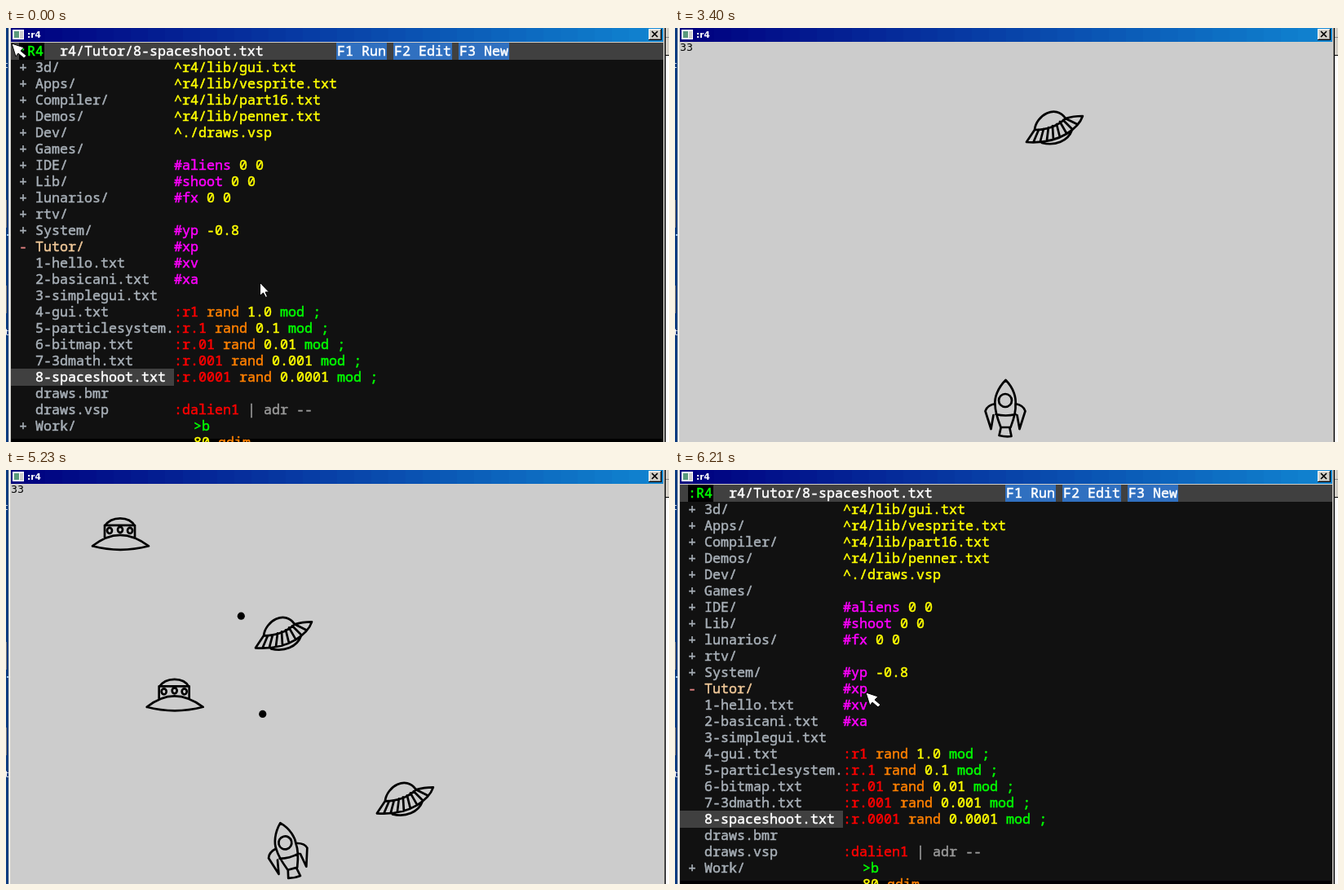
An HTML page with a canvas for the animation above (8000 ms loop, 813 px wide and 508 px high).

```html
<!DOCTYPE html>
<html lang="en">
<head>
<meta charset="utf-8">
<title>r4</title>
<style>
  html, body { margin: 0; width: 100%; height: 100%; overflow: hidden; background: #fff; }
  canvas { display: block; }
</style>
</head>
<body>
<canvas id="stage" width="813" height="508"></canvas>
<script>
const ctx = document.getElementById('stage').getContext('2d');
const LOOP = 8000, GAME_START = 2140, GAME_END = 6210, MOUSE_HIDDEN = 2710;

// Moments at which the screen refreshes; the picture holds in between.
const REFRESH = [0, 400, 840, 2140, 2710, 2860, 2980, 3130, 3260, 3400, 3560, 3700, 3830,
  3980, 4110, 4260, 4410, 4570, 4690, 4830, 4980, 5105, 5230, 5380, 5530, 5655, 5780,
  5940, 6090, 6210];

const MONO = '16.667px "Noto Sans Mono", "DejaVu Sans Mono", monospace';
const CELL = 10, ROW = 20, BAR = 21;

function rect(color, x, y, w, h) {
  ctx.fillStyle = color;
  ctx.fillRect(x, y, w, h);
}

function text(str, x, y, color, font) {
  ctx.font = font;
  ctx.fillStyle = color;
  ctx.fillText(str, x, y);
}

// Editor text, thickened a little to look like a solid screen font.
function monoText(str, x, y, color) {
  text(str, x, y, color, MONO);
  ctx.strokeStyle = color;
  ctx.lineWidth = .5;
  ctx.strokeText(str, x, y);
}

function at(x, y, draw, degrees = 0) {
  ctx.save();
  ctx.translate(x, y);
  ctx.rotate(degrees * Math.PI / 180);
  draw();
  ctx.restore();
}

function track(keys, t) {
  const i = Math.max(1, keys.findIndex(k => k[0] >= t));
  const [t0, a] = keys[i - 1], [t1, b] = keys[i];
  return a + (b - a) * Math.min(1, Math.max(0, (t - t0) / (t1 - t0)));
}

// ---------- window ----------

function drawFrame() {
  rect('#0a3c80', 0, 0, 3, 508);
  rect('#d4d0c8', 3, 0, 803, 508);
  rect('#fff', 4, 0, 1, 508);
  rect('#777', 0, 211, 1, 34);
  rect('#777', 0, 316, 1, 34);
  text('t', -2, 49, '#fff', '11px "DejaVu Sans", sans-serif');
  text('t', -1, 377, '#fff', '11px "DejaVu Sans", sans-serif');
  rect('#9cf', 1, 253, 2, 2);

  const bands = 38, width = 800 / bands;
  for (let i = 0; i < bands; i++) {
    const p = i / (bands - 1), x = Math.round(6 + i * width);
    rect(`rgb(${16 * p},${132 * p},${128 + 80 * p})`, x, 0, 806 - x, 17);
  }
  rect('#d4d0c8', 806, 0, 1, 508);
  rect('#808080', 807, 0, 1, 508);
  rect('#000', 808, 0, 1, 508);
  rect('#fff', 809, 0, 4, 508);
  rect('#d4d0c8', 809, 0, 4, 33);
  rect('#888', 809, 11, 4, 1);
  rect('#000', 809, 33, 4, 1);

  rect('#fff', 8, 2, 14, 12);
  rect('#5a9a7c', 10, 4, 6, 8);
  rect('#ccc', 17, 4, 4, 9);
  text(':r4', 26, 12, '#fff', 'bold 10.5px "DejaVu Sans", sans-serif');

  rect('#000', 788, 1, 16, 14);
  rect('#fff', 788, 1, 15, 13);
  rect('#808080', 789, 2, 14, 12);
  rect('#d4d0c8', 789, 2, 13, 11);
  ctx.strokeStyle = '#000';
  ctx.lineWidth = 1.7;
  ctx.stroke(new Path2D('M792 4L799 11M799 4L792 11'));
}

const mouseShape = new Path2D('M.5 .5V16.5L4.5 13L7.5 18.5L9.5 17.5L7 12H11.5Z');
const pointerShape = new Path2D('M0 0L15 5L11 9L18 15L15 18L8 12L5 16Z');

function drawCursor(shape, x, y) {
  at(x, y, () => {
    ctx.lineWidth = 1;
    ctx.strokeStyle = '#000';
    ctx.fillStyle = '#fff';
    ctx.fill(shape);
    ctx.stroke(shape);
  });
}

// ---------- editor ----------

const FILES = ['+ 3d/', '+ Apps/', '+ Compiler/', '+ Demos/', '+ Dev/', '+ Games/', '+ IDE/',
  '+ Lib/', '+ lunarios/', '+ rtv/', '+ System/', '- Tutor/', '  1-hello.txt',
  '  2-basicani.txt', '  3-simplegui.txt', '  4-gui.txt', '  5-particlesystem.',
  '  6-bitmap.txt', '  7-3dmath.txt', '  8-spaceshoot.txt', '  draws.bmr', '  draws.vsp',
  '+ Work/'];

const SHOOT_CODE = `^r4/lib/gui.txt
^r4/lib/vesprite.txt
^r4/lib/part16.txt
^r4/lib/penner.txt
^./draws.vsp

#aliens 0 0
#shoot 0 0
#fx 0 0

#yp -0.8
#xp
#xv
#xa

:r1 rand 1.0 mod ;
:r.1 rand 0.1 mod ;
:r.01 rand 0.01 mod ;
:r.001 rand 0.001 mod ;
:r.0001 rand 0.0001 mod ;

:dalien1 | adr --
\t>b
\t80 qdim`.split('\n');

const MATH_CODE = `^r4/lib/gui.txt
^r4/lib/3d.txt

#xcam 0 #ycam 0 #zcam -10.0

:freelook
\txypen
\tsh 1 >> - 7 << swap
\tsw 1 >> - neg 7 << swap
\tneg mrotx mroty ;

:3dop project3d op ;
:3dline project3d line ;

:drawboxz | z --
\t-0.5 -0.5 pick2 3dop
\t0.5 -0.5 pick2 3dline
\t0.5 0.5 pick2 3dline
\t-0.5 0.5 pick2 3dline
\t-0.5 -0.5 rot 3dline ;

:drawlinez | x1 x2 --
\t2dup -0.5 3dop 0.5 3dline ;

:drawcube | --
\t-0.5 drawboxz`.split('\n');

function tokenColor(token) {
  if (token[0] === '|') return '#999';
  if (token[0] === '#') return '#f0f';
  if (token[0] === ':') return '#f00';
  if (token[0] === '^' || /^-?\d[\d.]*$/.test(token)) return '#ff0';
  return /^(mod|swap|neg|;|>b|>>|<<|-)$/.test(token) ? '#0f0' : '#ff8000';
}

function drawCode(lines) {
  lines.forEach((line, row) => {
    const left = line[0] === '\t' ? 230 : 206;
    for (const m of line.trim().matchAll(/\|.*|\S+/g))
      monoText(m[0], left + m.index * CELL, 54 + row * ROW, tokenColor(m[0]));
  });
}

function drawEditor(selected, code) {
  rect('#111', 6, 18, 800, 490);
  rect('#000', 6, 504, 800, 4);
  rect('#404040', 6, 18, 800, BAR);
  rect('#000', 16, 18, 31, BAR);
  monoText(':R4', 16, 34, '#0f0');
  monoText('r4/Tutor/' + FILES[selected].trim(), 66, 34, '#fff');
  [['F1 Run', 406], ['F2 Edit', 476], ['F3 New', 556]].forEach(([label, x]) => {
    rect('#3070c0', x - 1, 18, label.length * CELL + 2, BAR);
    monoText(label, x, 34, '#fff');
  });

  rect('#404040', 6, 38 + selected * ROW, 200, BAR);
  FILES.forEach((name, row) => {
    const open = name[0] === '-', y = 54 + row * ROW;
    monoText(name[0], 16, y, open ? '#e08080' : '#a8b0b8');
    monoText(name.slice(2), 36, y, row === selected ? '#fff' : open ? '#f0c898' : '#a8b0b8');
  });
  drawCode(code);
}

// ---------- game ----------

const rocketShape = new Path2D(`M0 -34C-10 -24 -14 -12 -13 -4C-13 6 -9 16 -6 24
  H6C9 16 13 6 12 -4C13 -12 10 -24 0 -34ZM-12 8Q0 11 12 8M-6 25L-8 34Q0 36 7 35L5 25
  M-13 -5Q-23 -3 -25 4L-18 26L-15 9M12 -5Q22 -3 24 4L17 26L14 9
  M7.5 -9A8 8 0 1 1 -8.5 -9A8 8 0 1 1 7.5 -9`);

const domeShape = new Path2D(`M16 10Q22 .5 35 .5Q48 .5 53 10M16 24V9H53V24
  M1 34.5Q18 21 35 21Q52 21 70 34.5Q35 43.5 1 34.5
  M25 15.5A3 3.5 0 1 1 19 15.5A3 3.5 0 1 1 25 15.5
  M38 14.5A3 3.5 0 1 1 32 14.5A3 3.5 0 1 1 38 14.5
  M50 15.5A3 3.5 0 1 1 44 15.5A3 3.5 0 1 1 50 15.5`);

const saucerShape = new Path2D(`M11 24C13 6 37 -8 49 10M11 24Q34 24 49 10
  M11 24L1 39Q30 41 50 29Q66 19 70 7Q58 7 49 10M20 40C36 44 52 38 57 24
  M16 24L10 38M22 23L18 38M28 21L26 37M33 19L34 36M38 17L42 33M42 14L50 28M46 12L57 23M49 10L63 17`);

// Distance fallen by every alien, the clock all game objects share.
const FALL = [[2860, -217], [2980, -198], [3260, -153], [3400, -130], [3560, -103],
  [4260, 0], [4830, 85], [5780, 242.5], [6210, 314]];
const ROCKET_X = [[3560, 405.5], [3700, 409], [3865, 425], [4091, 456], [4260, 467.5],
  [4383, 466], [4635, 437], [4830, 408.5], [5780, 258], [6210, 190]];
const ROCKET_TILT = [[3560, 0], [3865, 13], [4091, 9.5], [4260, 2], [4383, -6],
  [4635, -15], [6210, -15]];

const ALIENS = [
  { shape: saucerShape, x: 441, y: 231, drift: .085, from: -217 },
  { shape: domeShape, x: 193, y: 105, drift: -.141, from: -103 },
  { shape: domeShape, x: 361, y: 125, drift: .118, from: -103, until: 100 },
  { shape: saucerShape, x: 315, y: 28, drift: -.066, from: -23 },
  { shape: domeShape, x: 105, y: -92.5, drift: 0, from: 105 },
  { shape: saucerShape, x: 663, y: -264, drift: 0, from: 265 },
];
const BULLETS = [
  { x: 425, drift: 1.48, from: -59.3 },
  { x: 456.3, drift: 1.094, from: -25.3 },
  { x: 466, drift: -.7, from: 18, until: 100 },
  { x: 436.5, drift: -1.55, from: 55.7 },
  { x: 398, drift: -1.5, from: 95.8 },
  { x: 328.5, drift: -1.5, from: 168.2 },
  { x: 256.5, drift: -1.5, from: 242.5 },
];

function drawGame(t) {
  const fall = track(FALL, t);
  const alive = o => t >= 2860 && fall >= o.from && fall < (o.until ?? Infinity);
  ctx.save();
  ctx.beginPath();
  ctx.rect(6, 18, 800, 490);
  ctx.clip();
  rect('#ccc', 6, 18, 800, 490);
  text('33', 6, 28, '#000', '12.5px "DejaVu Sans", sans-serif');

  ctx.strokeStyle = '#000';
  ctx.lineWidth = 2.7;
  ctx.lineJoin = ctx.lineCap = 'round';
  for (const a of ALIENS.filter(alive))
    at(a.x + a.drift * fall, a.y + fall, () => ctx.stroke(a.shape));
  at(track(ROCKET_X, t), 466, () => ctx.stroke(rocketShape), track(ROCKET_TILT, t));

  ctx.fillStyle = '#000';
  for (const b of BULLETS.filter(alive)) {
    const age = fall - b.from;
    ctx.beginPath();
    ctx.arc(b.x + b.drift * age, 466 - 3 * age, 4.6, 0, 2 * Math.PI);
    ctx.fill();
  }
  ctx.restore();
}

// ---------- playback ----------

function draw(now) {
  const time = now % LOOP;
  const t = REFRESH.findLast(r => r <= time);
  drawFrame();
  if (t >= GAME_START && t < GAME_END) drawGame(t);
  else {
    if (t >= 400 && t < 840) drawEditor(18, MATH_CODE);
    else drawEditor(19, SHOOT_CODE);
    if (t < GAME_START) drawCursor(pointerShape, 7, 19);
    else drawCursor(pointerShape, 234, 273);
  }
  if (t < MOUSE_HIDDEN) drawCursor(mouseShape, 311, 312);
}

const start = performance.now();
function tick() {
  draw(performance.now() - start);
  requestAnimationFrame(tick);
}
tick();
</script>
</body>
</html>
```
